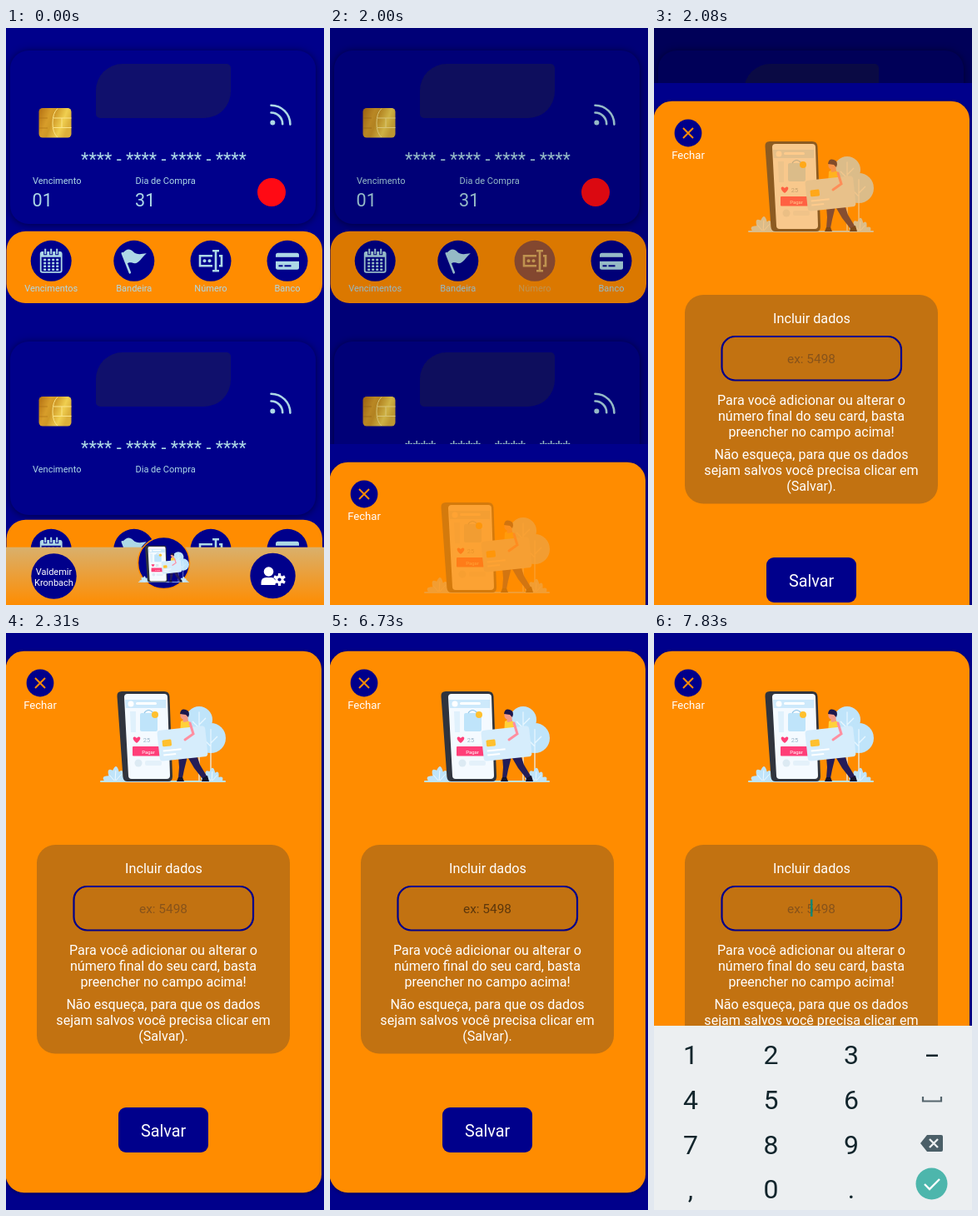
Recreate the animation shown at these times as an HTML page. Size 382x692 px, loop 8 s.

```html
<!DOCTYPE html>
<html lang="pt-BR">
<head>
<meta charset="utf-8">
<title>Cartões</title>
<style>
  html, body { margin: 0; width: 100%; height: 100%; overflow: hidden; background: #00008b; }
  svg { display: block; font-family: Roboto, sans-serif; }
  .card { fill: #00008b; filter: drop-shadow(0 1px 5px rgba(0, 0, 0, .5)); }
  .sky { fill: #add8e6; }
  .line { fill: none; stroke: #add8e6; }
  .navy { fill: #00008b; }
  .orange { fill: #ff8c00; }
  .mid { text-anchor: middle; }
  .white { fill: #fff; }
  .key { fill: #12252c; font-size: 32px; text-anchor: middle; }
</style>
</head>
<body>
<svg id="stage" width="382" height="692" viewBox="0 0 382 692"></svg>
<script>
const LOOP = 8000;
const stage = document.getElementById('stage');

const text = (x, y, size, str, cls = 'sky mid') =>
  `<text x="${x}" y="${y}" font-size="${size}" class="${cls}">${str}</text>`;
const rect = (x, y, w, h, r, attrs) =>
  `<rect x="${x}" y="${y}" width="${w}" height="${h}" rx="${r}" ${attrs}/>`;
const disc = (x, y, r, attrs) => `<circle cx="${x}" cy="${y}" r="${r}" ${attrs}/>`;
const path = (d, attrs) => `<path d="${d}" ${attrs}/>`;
const at = (x, y, body, extra = '') => `<g transform="translate(${x} ${y}) ${extra}">${body}</g>`;
const range = n => [...Array(n).keys()];

// Icons are drawn around their own centre.
const icons = {
  calendar: rect(-12.5, -10.5, 25, 24, 2, 'class="line" stroke-width="1.8"')
    + rect(-12.5, -11, 25, 6.5, 1.5, 'class="sky"')
    + path('M-7-13v6M0-13v6M7-13v6', 'stroke="#00008b" stroke-width="4"')
    + path('M-7-14.500v6.500M0-14.500v6.500M7-14.500v6.500', 'class="line" stroke-width="2"')
    + range(16).map(i => rect(-9 + i % 4 * 5, -2.5 + (i / 4 | 0) * 3.9, 3, 2.5, .3, 'class="sky"')).join(''),
  flag: path('M-14-9L-5 14', 'class="line" stroke-width="2.6" stroke-linecap="round"')
    + path('M-14-9C-9-15-5-15-1-11C3-7 8-8 15-9C9-4 6 3 1 3C-4 2-6 1-9 4Z', 'class="sky"'),
  field: path('M2-6H-13V6H2M10-6H13V6H10', 'class="line" stroke-width="2.600"')
    + path('M2-12H10M6-12V12M2 12H10', 'class="line" stroke-width="2.600"')
    + disc(-7.5, 0, 2, 'class="sky"') + disc(-1.5, 0, 2, 'class="sky"'),
  bank: rect(-14, -9.5, 28, 20, 2.5, 'class="sky"')
    + rect(-14, -4.5, 28, 5, 0, 'class="navy"')
    + rect(-10.5, 5, 5, 2, 0, 'class="navy"') + rect(-3.5, 5, 8, 2, 0, 'class="navy"'),
  user: disc(-5, -5, 5.8, 'class="white"')
    + path('M-14 11V8Q-14 2-8 2H-2Q2 2 3 6V11Z', 'class="white"')
    + range(6).map(i => `<rect x="6.4" y="-3" width="3.2" height="13" class="white" transform="rotate(${i * 60} 8 4.5)"/>`).join('')
    + disc(8, 4.5, 5, 'class="white"') + disc(8, 4.5, 2.1, 'class="navy"'),
};

const chip = rect(39.5, 96, 39, 35.5, 4.5, 'fill="url(#gold)"')
  + path('M62 96.500Q56 102 56 114Q56 126 62 131M57 108H78.500M57 119.500H78.500M67 108V119.500', 'fill="none" stroke="#fbe488" stroke-width="1"')
  + path('M40 108H50M40 120H50', 'fill="none" stroke="#a96e13" stroke-width=".6"');

const waves = disc(320.3, 113.6, 3, 'class="sky"')
  + path('M318.500 101.500A13.700 13.700 0 0 1 332.200 115.200M318.500 92.700A22.900 22.900 0 0 1 341.400 115.600', 'class="line" stroke-width="2.6" stroke-linecap="round"');

const button = (x, icon, label, id) => `<g ${id ? `id="${id}"` : ''}>`
  + disc(x, 279.3, 24.5, 'class="navy"') + at(x, 279.3, icons[icon]) + text(x, 316, 11, label) + '</g>';

const card = (y, plateY, filled) => at(0, y,
  rect(5, plateY, 367, 208, 22, 'class="card"')
  + path('M140 43H265A5 5 0 0 1 270 48V76A32 32 0 0 1 238 108H113A5 5 0 0 1 108 103V75A32 32 0 0 1 140 43Z', 'fill="#10106c"')
  + chip + waves
  + text(189.500, 165, 21.6, '**** - **** - **** - ****')
  + text(32, 187, 11, 'Vencimento', 'sky') + text(155.500, 187, 11, 'Dia de Compra', 'sky')
  + (filled ? text(31.500, 213.500, 21.6, '01', 'sky') + text(155, 213.500, 21.6, '31', 'sky') + disc(319, 197, 17, 'fill="#ff0a14"') : '')
  + rect(.5, 243.800, 379.500, 86.200, 23, 'class="orange"')
  + button(54.2, 'calendar', 'Vencimentos') + button(153.800, 'flag', 'Bandeira')
  + button(246, 'field', 'Número', filled && 'numero') + button(338, 'bank', 'Banco'));

const bush = (x, s) => at(x, 178,
  path('M-13 0Q-19-7-8-7Q-11-18-3-14Q2-25 5-12Q11-17 10-6Q18-8 15 0Z', 'fill="#bfe4fa"')
  + path('M0 0L1-14M0 0L8-9M0 0L-7-8', 'stroke="#fff" stroke-width=".8"'), `scale(${s})`);
const tree = (x, y, r) => disc(x, y, r, 'fill="#bfe4fa"')
  + path(`M${x} ${y - r * .6}V177M${x} ${y + 6}l8-8M${x} ${y + 10}l-8-8`, 'fill="none" stroke="#e9f7ff" stroke-width="1.2"');

const art = tree(232, 104, 16) + tree(246, 126, 18) + bush(131, .95) + bush(247, .85)
  + rect(113, 177, 151, 2, 1, 'fill="#bfe4fa"')
  + path('M139 70H190Q196 70 196.500 76L200 172Q200 178 195 178H146Q141 178 140.500 173L133.500 76Q133 70 139 70Z', 'fill="#30343d"')
  + path('M146 73H190Q194 73 194 77L197 171Q197 175 193 175H151Q147 175 147 171L142 77Q142 73 146 73Z', 'fill="#f4faff"')
  + path('M143 80H192V90H144Z', 'fill="#cde9fb"') + disc(150, 85, 3.5, 'fill="#fff"')
  + rect(156, 83, 25, 3, 1.5, 'fill="#fff"')
  + path('M149 94H156V119H150Z', 'fill="#e0f1fc"') + rect(161, 96, 21, 22, 2, 'fill="#bfe4fa"')
  + path('M166 96Q171 89 177 96', 'fill="none" stroke="#8fc4e6" stroke-width="1.200"')
  + disc(179, 98, 4, 'fill="#ffc02e"')
  + path('M157 132C149 126 154 122 157 126C160 122 165 126 157 132Z', 'fill="#ff3f78"')
  + text(169, 131, 7.5, '25', 'mid" fill="#9db7c9')
  + rect(152, 136, 35, 11.5, 1, 'fill="#ff3f78"') + text(171, 144.500, 6, 'Pagar', 'white mid')
  + disc(159, 156, 4.5, 'fill="#dceaf3"') + rect(167, 153, 20, 6, 2, 'fill="#e4f1fa"')
  + path('M207 148H218L214 164L212 174H207L208 161Z', 'fill="#241d58"')
  + path('M216 145L228 143L233 158L242 173L237 176L226 162Z', 'fill="#241d58"')
  + path('M207 173H212L214 178H205ZM236 174L242 171L244 178H235Z', 'fill="#12122c"')
  + path('M210 106Q216 102 221 107L225 121L217 129L209 121Z', 'fill="#ffd13a"')
  + path('M212 101L218 98L219 106L213 107Z', 'fill="#f29a86"') + disc(214, 99, 4.6, 'fill="#f29a86"')
  + path('M209 97Q210 90 216 92Q222 94 219 101L216 98Z', 'fill="#1b174c"')
  + `<g transform="rotate(-6 212 133)">${rect(183, 114, 58, 37, 4, 'fill="#d6edfc"')}${rect(188, 126, 11, 8, 1.5, 'fill="#ffc02e"')}`
  + path('M188 139H210M188 144H203', 'stroke="#fff" stroke-width="2"') + '</g>'
  + path('M221 108L225 121L215 128', 'fill="none" stroke="#ff8fa0" stroke-width="3" stroke-linecap="round"');

const dock = rect(0, 622.700, 382, 70, 0, 'fill="url(#bar)"')
  + disc(57.500, 657.500, 27.2, 'class="navy"')
  + text(57.500, 656, 11, 'Valdemir', 'white mid') + text(57.500, 669, 11, 'Kronbach', 'white mid')
  + disc(189.500, 641.500, 31, 'class="navy" stroke="#ff8c00" stroke-width="1.500"')
  + at(113, 592.500, art, 'scale(.405)')
  + disc(320.500, 657, 27.2, 'class="navy"') + at(320.500, 657, icons.user);

const lines = [
  [385.7, 'Para você adicionar ou alterar o'], [404.700, 'número final do seu card, basta'],
  [423.700, 'preencher no campo acima!'], [451.300, 'Não esqueça, para que os dados'],
  [470.300, 'sejam salvos você precisa clicar em'], [489.300, '(Salvar).'],
];

const sheet = '<g id="sheet">' + rect(0, 0, 382, 692, 0, 'class="navy"')
  + rect(-.5, 21.700, 379.500, 649.500, 22, 'class="orange" style="filter:drop-shadow(0 1px 2px rgba(0,0,0,.4))"')
  + disc(41, 60, 16.4, 'class="navy"')
  + path('M35 54L47 66M47 54L35 66', 'stroke="#ff8c00" stroke-width="2"')
  + text(41, 90.500, 13.1, 'Fechar', 'white mid') + `<g id="art">${art}</g>`
  + rect(37, 254, 304, 250.500, 22, 'fill="#c27211"')
  + text(189.500, 287.500, 16.2, 'Incluir dados', 'white mid')
  + rect(81.500, 304, 215.500, 52.500, 16, 'fill="none" stroke="#00008b" stroke-width="2.200"')
  + '<g id="hint">' + text(189, 336, 15.4, 'ex: 5498', 'mid') + '</g>'
  + rect(188, 319.500, 2.5, 20.500, 0, 'id="caret" fill="#128572"')
  + lines.map(([y, s]) => text(189, y, 16.1, s, 'white mid')).join('')
  + rect(135, 569, 108, 54, 9, 'class="navy"') + text(189, 604, 19.8, 'Salvar', 'white mid') + '</g>';

const rows = ['123', '456', '789', ',0.'];
const keyboard = '<g id="keyboard">' + rect(0, 471, 382, 221, 0, 'fill="#eceff1"')
  + rows.map((row, j) => [...row].map((c, i) => text(44 + i * 96.500, 517 + j * 53.800, 32, c, 'key')).join('')).join('')
  + rect(327, 505.500, 14, 2.5, 0, 'fill="#12252c"')
  + path('M323 556V561.500H345V556', 'fill="none" stroke="#55656d" stroke-width="2.200"')
  + path('M328 602H345Q347 602 347 604V620Q347 622 345 622H328L320 612Z', 'fill="#4b5f68"')
  + path('M331 607L341 617M341 607L331 617', 'stroke="#eceff1" stroke-width="2.400"')
  + disc(333.500, 660.500, 19, 'fill="#4db6ac"')
  + path('M325 661L331 667L343 655', 'fill="none" stroke="#fff" stroke-width="2.400"') + '</g>';

stage.innerHTML = `<defs>
  <linearGradient id="gold" x2="1" y2=".35"><stop stop-color="#b36f12"/><stop offset=".35" stop-color="#d79d2a"/>
    <stop offset=".5" stop-color="#cf9826"/><stop offset=".8" stop-color="#f0cf50"/><stop offset="1" stop-color="#dcb03a"/></linearGradient>
  <linearGradient id="bar" x2="0" y2="1"><stop stop-color="#d9b06c"/><stop offset="1" stop-color="#ff8c00"/></linearGradient>
</defs>` + rect(0, 0, 382, 692, 0, 'class="navy"') + card(0, 27, true) + card(346, 30, false) + dock
  + rect(0, 0, 382, 692, 0, 'id="dim"') + sheet + keyboard;

// Each track holds a value until the next time (ms).
const tracks = [
  ['numero', 'opacity', [[0, 1], [1220, .2], [2000, .4], [2080, .6], [2160, 1]]],
  ['dim', 'opacity', [[0, 0], [2000, .14], [2080, .37], [2160, .5]]],
  ['sheet', 'transform', [[0, 720], [2000, 499], [2080, 66], [2160, 9], [2240, 1], [2310, 0]]],
  ['art', 'opacity', [[0, 0], [2000, .2], [2080, .55], [2160, .8], [2240, .95], [2310, 1]]],
  ['hint', 'fill', [[0, '#87531b'], [6730, '#5c370c'], [6810, '#724513'], [6880, '#87531b']]],
  ['caret', 'opacity', [[0, 0], [6880, 1], [7280, 0], [7830, 1]]],
  ['keyboard', 'transform', [[0, 240], [7050, 150], [7130, 45], [7210, 8], [7280, 0]]],
];

for (const [id, prop, steps] of tracks) {
  const value = v => prop === 'transform' ? `translateY(${v}px)` : v;
  const frames = [...steps, [LOOP, steps.at(-1)[1]]]
    .map(([t, v]) => ({ offset: t / LOOP, [prop]: value(v), easing: 'step-end' }));
  document.getElementById(id).animate(frames, { duration: LOOP, iterations: Infinity });
}
</script>
</body>
</html>
```
